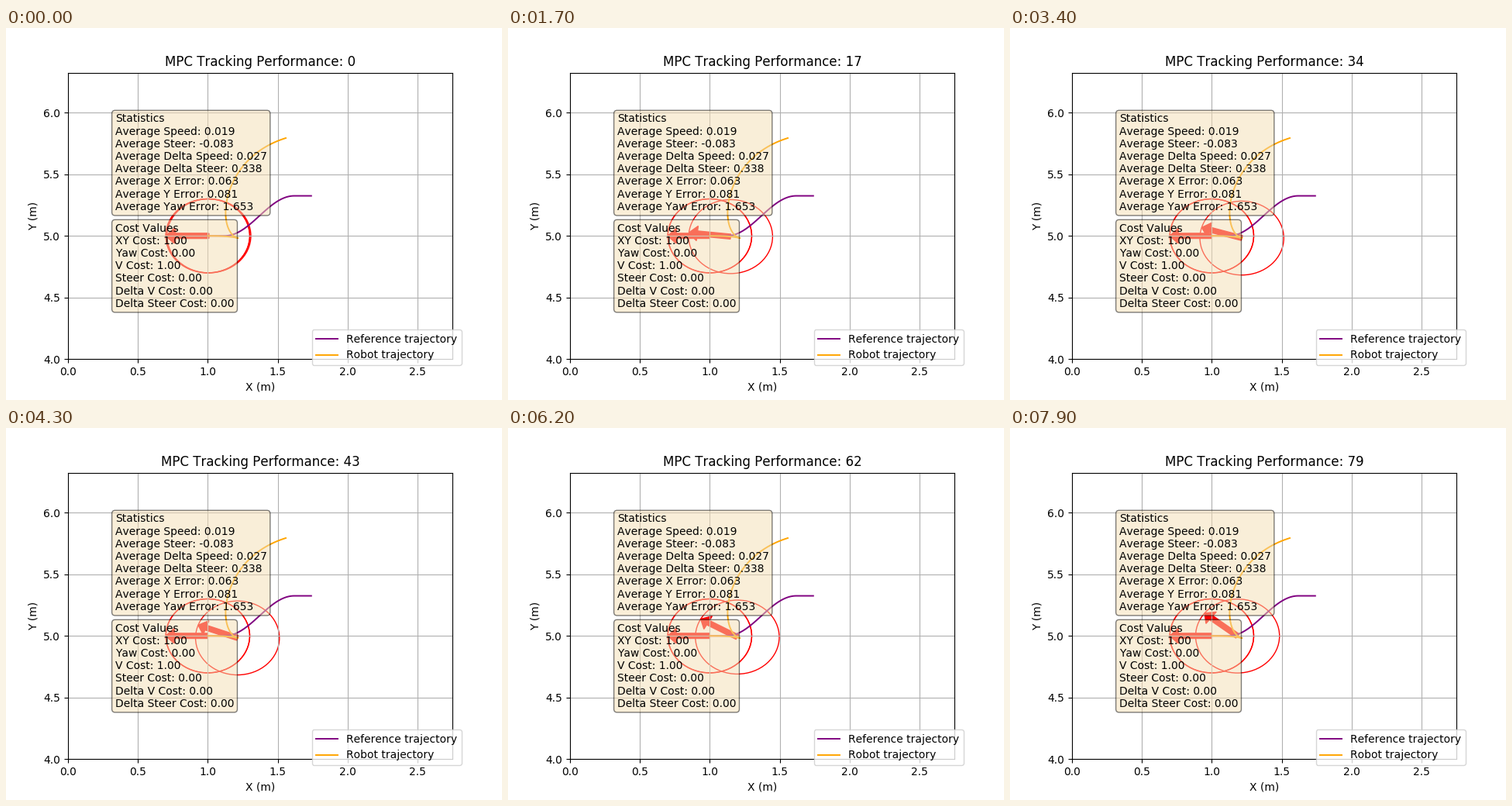
A matplotlib script that plays this animation: 640x480 px, repeating every 8 s.

```python
import numpy as np
import matplotlib.pyplot as plt
from matplotlib.animation import FuncAnimation
from matplotlib.patches import Circle, Polygon

FRAMES, INTERVAL = 80, 100
RADIUS = 0.3
CRUISE, RETURN = 0.0083, -0.0009  # metres per step
START = (1, 5)

STATS = """Statistics
Average Speed: 0.019
Average Steer: -0.083
Average Delta Speed: 0.027
Average Delta Steer: 0.338
Average X Error: 0.063
Average Y Error: 0.081
Average Yaw Error: 1.653"""

COSTS = """Cost Values
XY Cost: 1.00
Yaw Cost: 0.00
V Cost: 1.00
Steer Cost: 0.00
Delta V Cost: 0.00
Delta Steer Cost: 0.00"""


def drive():
    """Back away from the start, brake, then creep forward while turning."""
    step = np.arange(FRAMES)
    speed = np.interp(step, [21, 26, 32, 44], [CRUISE, 0.0027, 0.0005, RETURN])
    late = step - 25
    tilt = np.radians(np.where(late < 0, 13 * ((step + 1) / 26) ** 2,
                               13 + 0.38 * late + 0.0016 * late**2))
    x = START[0] + np.cumsum(speed * np.cos(tilt))
    y = START[1] - np.cumsum(speed * np.sin(tilt))
    return x, y, tilt


def bezier(p0, p1, p2, p3, n=80):
    p0, p1, p2, p3 = np.array([p0, p1, p2, p3], float)
    t = np.linspace(0, 1, n)[:, None]
    u = 1 - t
    return u**3 * p0 + 3 * u**2 * t * p1 + 3 * u * t**2 * p2 + t**3 * p3


def arrow_points(x, y, tilt):
    """Arrow of length RADIUS, pointing left and tilted upwards."""
    half = [(0, .02), (.8, .02), (.8, .06), (1, 0)]
    shape = np.array(half + [(u, -v) for u, v in half[-2::-1]]) * [RADIUS, 1]
    c, s = np.cos(np.pi - tilt), np.sin(np.pi - tilt)
    return shape @ np.array([[c, s], [-s, c]]) + [x, y]


def add_robot():
    ring = ax.add_patch(Circle(START, RADIUS, fill=False, ec="red", lw=1))
    arrow = ax.add_patch(Polygon(arrow_points(*START, 0), color="red", lw=1))
    return ring, arrow


def note(y, text):
    fig.text(0.22, y, text, va="top", fontsize=10,
             bbox=dict(boxstyle="round", facecolor="wheat", alpha=0.5))


plt.rcParams["text.kerning_factor"] = 6
fig, ax = plt.subplots(figsize=(6.4, 4.8), dpi=100)
ax.set(xlim=(0, 2.75), ylim=(4, 6.325), xlabel="X (m)", ylabel="Y (m)")
ax.grid(True)

xs, ys, tilts = drive()

reference = np.vstack([
    START,
    bezier((1.12, 5), (1.305, 5), (1.434, 5.325), (1.619, 5.325)),
    (1.74, 5.325)])
driven = np.vstack([
    START,
    np.column_stack([xs, ys])[:55],
    bezier((1.2, 4.988), (1.0555, 5.078), (1.104, 5.636), (1.558, 5.794))])

ax.plot(*reference.T, color="purple", lw=1.4, label="Reference trajectory")
ax.plot(*driven.T, color="orange", lw=1.4, label="Robot trajectory")
ax.legend(loc="lower right", bbox_to_anchor=(1.0375, -0.04))
title = ax.set_title("")

note(0.77, STATS)
note(0.476, COSTS)

# The start pose is stacked twice, which gives it a heavier outline
add_robot()
add_robot()
ring, arrow = add_robot()


def update(step):
    x, y, tilt = xs[step], ys[step], tilts[step]
    ring.center = x, y
    arrow.set_xy(arrow_points(x, y, tilt))
    title.set_text(f"MPC Tracking Performance: {step}")
    return ring, arrow, title


anim = FuncAnimation(fig, update, frames=FRAMES, interval=INTERVAL,
                     repeat=True, repeat_delay=0, blit=False)
plt.show()
```
